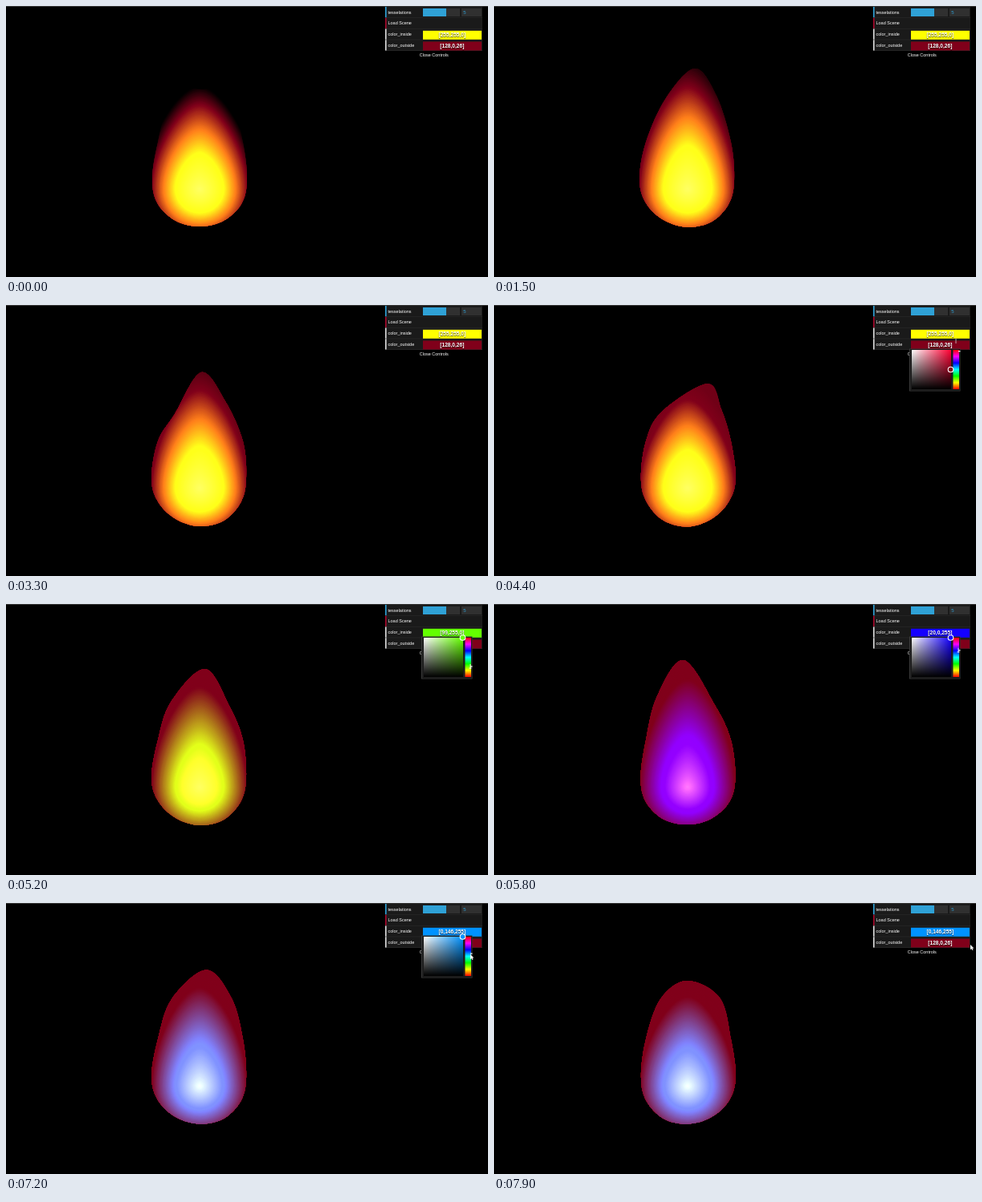
Recreate the animation shown at these times as an HTML page with a canvas. Size 600 px wide and 338 px high, loop 8000 ms.

```html
<!DOCTYPE html>
<html lang="en">
<head>
<meta charset="utf-8">
<title>Flame with controls</title>
<style>
html, body { margin: 0; width: 100%; height: 100%; overflow: hidden; background: #000; }
canvas { display: block; width: 600px; height: 338px; }
</style>
</head>
<body>
<canvas id="stage" width="600" height="338"></canvas>
<script>
const ctx = document.getElementById('stage').getContext('2d');
const LOOP = 8000, STEP = 100, CX = 241, CORE_Y = 228;
const OUTSIDE = [128, 0, 26];

// Left shoulder, tip and right shoulder of the flame
const POSES = [
  [0, [[207, 107], [243, 104], [279, 107]]],
  [1500, [[214, 115], [250, 78], [277, 112]]],
  [3300, [[210, 136], [243, 84], [273, 120]]],
  [4400, [[209, 133], [266, 98], [283, 130]]],
  [5800, [[203, 115], [236, 70], [276, 128]]],
  [6600, [[206, 119], [257, 73], [281, 120]]],
  [7900, [[207, 120], [240, 97], [281, 118]]]
];
const HUE = [[5000, 60], [5700, 244.7], [5800, 244.7], [6600, 195.06], [7100, 205.65]];
const CURSOR = [
  [3450, [604, 22]], [3800, [575, 45]], [4500, [575, 45]], [4800, [566, 36]],
  [5050, [578, 84]], [7200, [578, 64]], [7500, [593, 52]]
];

const clamp = v => Math.max(0, Math.min(1, v));
const mix = (a, b, u) => Array.isArray(a) ? a.map((v, i) => mix(v, b[i], u)) : a + (b - a) * u;
const rgb = c => `rgb(${c.map(Math.round)})`;

function at(keys, t) {
  const i = keys.findIndex(k => k[0] > t);
  if (i < 1) return keys[i ? keys.length - 1 : 0][1];
  const [t0, a] = keys[i - 1], [t1, b] = keys[i];
  const u = (t - t0) / (t1 - t0);
  return mix(a, b, u * u * (3 - 2 * u));
}

function hueRgb(h) {
  return [0, 8, 4].map(n => {
    const k = (n + h / 30) % 12;
    return Math.round(255 * (.5 - .5 * Math.max(-1, Math.min(k - 3, 9 - k, 1))));
  });
}

function rect(color, x, y, w, h) {
  ctx.fillStyle = color;
  ctx.fillRect(x, y, w, h);
}

function text(s, x, y, color = '#fff', font = '5.5px') {
  ctx.font = `${font} "Liberation Sans", Arial, sans-serif`;
  ctx.fillStyle = color;
  ctx.fillText(s, x, y);
}

function fade(x0, y0, x1, y1, ...colors) {
  const g = ctx.createLinearGradient(x0, y0, x1, y1);
  colors.forEach((c, i) => g.addColorStop(i / (colors.length - 1), c));
  return g;
}

// Closed Catmull-Rom curve
function smooth(pts) {
  const n = pts.length, path = new Path2D();
  path.moveTo(...pts[0]);
  for (let i = 0; i < n; i++) {
    const [a, b, c, d] = [n - 1, 0, 1, 2].map(k => pts[(i + k) % n]);
    path.bezierCurveTo(b[0] + (c[0] - a[0]) / 6, b[1] + (c[1] - a[1]) / 6,
      c[0] - (d[0] - b[0]) / 6, c[1] - (d[1] - b[1]) / 6, ...c);
  }
  return path;
}

// Round bowl below, moving shoulders and tip above
function outline(crown, t) {
  const pts = [];
  for (let i = 0; i <= 6; i++) {
    const a = i * Math.PI / 6, r = 59 + Math.sin(3 * a + t / 300);
    pts.push([CX + r * Math.cos(a), 217 + r * Math.sin(a)]);
  }
  return smooth([...pts, [189, 170], ...crown, [295, 170]]);
}

function teardrop(r, h) {
  const top = CORE_Y - h, bend = CORE_Y - h * .45;
  const path = new Path2D();
  path.moveTo(CX - r, CORE_Y);
  path.bezierCurveTo(CX - r, bend, CX - r * .4, top, CX, top);
  path.bezierCurveTo(CX + r * .4, top, CX + r, bend, CX + r, CORE_Y);
  path.arc(CX, CORE_Y, r, 0, Math.PI);
  return path;
}

// Light at depth s: 0 is the core, 1 the outer skin
function glow(s, inside, dusk) {
  const inner = clamp((.88 - s) / .43);
  const outer = 1 - dusk * clamp((s - .88) / .15);
  const white = clamp(1 - s / .42);
  return rgb(OUTSIDE.map((c, i) => Math.min(255, c * outer + inside[i] * inner + white * (i < 2 ? 125 : 75))));
}

function flame(t, inside) {
  const crown = at(POSES, t), height = CORE_Y - crown[1][1];
  const dusk = clamp(1 - t / 5000);
  ctx.save();
  ctx.clip(outline(crown, t));
  rect(glow(1.1, inside, dusk), 0, 0, 600, 338);
  for (let s = 1.1; s > .01; s -= .0125) {
    ctx.fillStyle = glow(s, inside, dusk);
    ctx.fill(teardrop(68 * s, height * s ** 1.25));
  }
  ctx.restore();
}

function swatch(color, y) {
  rect(rgb(color), 519, y, 73, 11);
  ctx.save();
  ctx.textAlign = 'center';
  ctx.shadowColor = 'rgba(0,0,0,.7)';
  ctx.shadowOffsetY = .5;
  ctx.shadowBlur = 1;
  text(`[${color}]`, 555.3, y + 7.5, '#fff', 'bold 6.6px');
  ctx.restore();
}

function panel(inside) {
  rect('#383838', 0, 0, 600, 1);
  rect('#1a1a1a', 472, 1, 121, 55);
  const rows = { tesselations: '#2fa1d6', 'Load Scene': '#a8082c', color_inside: '#ddd', color_outside: '#ddd' };
  Object.entries(rows).forEach(([label, color], i) => {
    const y = 1 + i * 13.75;
    rect('#2c2c2c', 472, y + 13.25, 121, .5);
    rect(color, 472, y, 1.6, 13.25);
    text(label, 475.5, y + 8.5);
  });
  rect('#303030', 519, 3, 46, 10);
  rect('#2fa1d6', 519, 3, 29, 10);
  rect('#303030', 567, 3, 25, 10);
  text('5', 569.3, 10.2, '#2fa1d6', '6px');
  text('Close Controls', 514.7, 62.8);
  swatch(inside, 30.8);
  swatch(OUTSIDE, 44.5);
}

function picker(y, hue, value) {
  const pure = hueRgb(hue), size = 49;
  rect('#3a3a3a', 517, y - 1.5, 63.5, 53);
  rect('#1c1c1c', 518, y - 1, 62, 52);
  rect(fade(520, 0, 569, 0, '#fff', rgb(pure)), 520, y, size, size);
  rect(fade(0, y, 0, y + size, 'rgba(0,0,0,0)', '#000'), 520, y, size, size);
  rect(fade(0, y, 0, y + size, '#f00', '#f0f', '#00f', '#0ff', '#0f0', '#ff0', '#f00'), 571.5, y, 7.5, size);
  rect('#fff', 578, y + size * (1 - hue / 360) - .5, 2.5, 1.2);
  ctx.beginPath();
  ctx.arc(568.5, y + size * (1 - value), 3.3, 0, 7);
  ctx.fillStyle = rgb(pure.map(c => c * value));
  ctx.fill();
  ctx.strokeStyle = '#fff';
  ctx.lineWidth = 1.1;
  ctx.stroke();
}

function cursor(t, hue) {
  if (t < CURSOR[0][0]) return;
  const [x, y] = at(CURSOR, t);
  if (t >= 3800 && t <= 4600) {
    rect('#ccc', x - .4, y - 3, .8, 6);
  } else if (t >= 5050 && t < 7200) {
    const knob = 42 + 49 * (1 - hue / 360);
    rect('#fff', x - .4, knob - 3, .9, 6);
    rect('#fff', x - 1.5, knob + 1.8, 3, .8);
  } else {
    ctx.fillStyle = '#fff';
    ctx.fill(new Path2D(`M${x} ${y}v6.2l1.5-1.3 1 2.2 1-.5-1-2.1h2z`));
  }
}

function draw(now) {
  const t = Math.floor(now % LOOP / STEP) * STEP;
  const hue = at(HUE, t), inside = hueRgb(hue);
  rect('#000', 0, 0, 600, 338);
  flame(t, inside);
  panel(inside);
  if (t >= 4100 && t < 4700) picker(56, 348, .5);
  if (t >= 4800 && t < 7400) picker(42, hue, 1);
  cursor(t, hue);
  requestAnimationFrame(draw);
}
requestAnimationFrame(draw);
</script>
</body>
</html>
```
